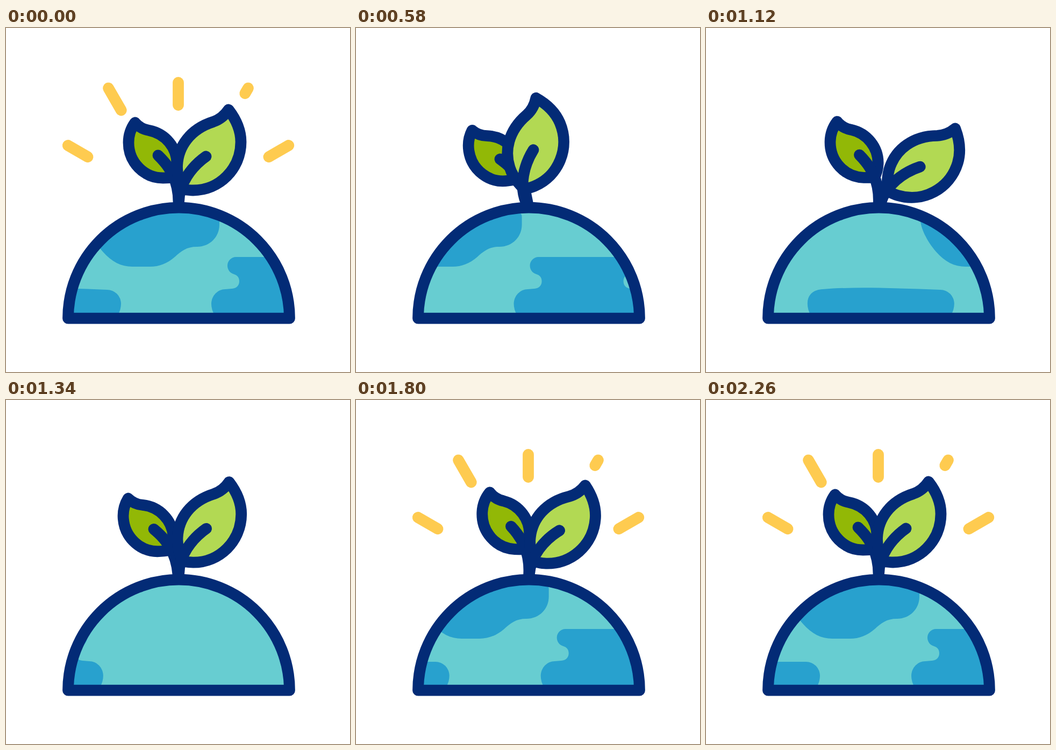
Recreate the animation shown at these times as an HTML page. Size 640 by 640 pixels, loop 2.4 s.

```html
<!DOCTYPE html>
<html lang="en">
<head>
<meta charset="utf-8">
<title>Sprouting globe</title>
<style>
html, body { margin: 0; width: 100%; height: 100%; overflow: hidden; background: #fff; }
svg { display: block; width: 100%; height: 100%; }
.ink { stroke: #032b76; stroke-width: 20.8; stroke-linecap: round; stroke-linejoin: round; }
.line { fill: none; }
.ray { stroke: #fecb50; stroke-width: 20.8; stroke-linecap: round; }
</style>
</head>
<body>
<svg viewBox="0 0 640 640" xmlns="http://www.w3.org/2000/svg">
  <defs>
    <clipPath id="dome"><path d="M115.5 540.2A206 206 0 0 1 527.5 540.2Z"/></clipPath>
    <g id="lands">
      <path d="M158 344H390Q397 344 397 351V366C397 388 380 407 355 407C336 407 326 415 314 426C300 438 285 444 268 444H235C214 444 197 435 180 416C163 396 151 372 151 355V351Q151 344 158 344Z"/>
      <path d="M428 426H592A16 16 0 0 1 608 442C608 450 603 456 596 458C589 460 586 465 586 471C586 479 591 484.5 600 485L612 486A26 27 0 0 1 638 513Q638 524 632 534H388Q382 524 382 513A26 27 0 0 1 408 486L420 485C429 484.5 434 479 434 471C434 465 431 460 424 458C417 456 412 450 412 442A16 16 0 0 1 428 426Z"/>
    </g>
  </defs>
  <g id="rays"></g>
  <g id="left">
    <path class="ink" fill="#92b806" d="M240 176C246 183 254 188.500 266 190.500C297 196.500 318 223 318 252C318 261 316 270 312 278C306 279 299 279 292 279C257 279 228 250 228 213C228 199 232 187 240 176Z"/>
    <path class="ink line" d="M283 237C304 257 321 283 321 324V337"/>
  </g>
  <g id="right">
    <path class="ink" fill="#b2d953" d="M414 152C408 161 400 169.500 385.500 174.500C344.500 187.500 318.500 219.500 318.500 260C319 276 323 290 329 300C335 301 341 302 348 302C397 302 437 262 437 212C437 190 428 170 414 152Z"/>
    <path class="ink line" d="M372 239C345 258 321.500 290 321.500 324V337"/>
  </g>
  <g clip-path="url(#dome)">
    <rect x="100" y="320" width="440" height="230" fill="#67cdd1"/>
    <g id="map" fill="#28a1ce">
      <use href="#lands"/>
      <path d="M-53 534Q-59 524 -59 513C-59 497 -49 487 -31 486C30 481 100 484 188 487A26 26 0 0 1 214 513Q214 524 208 534Z"/>
      <g id="next">
        <use href="#lands"/>
        <path d="M100 487H186A26 26 0 0 1 212 513Q212 524 206 534H100Z"/>
      </g>
    </g>
  </g>
  <path class="ink line" d="M115.5 540.2A206 206 0 0 1 527.5 540.2Z"/>
</svg>
<script>
const LOOP = 2400;
const ROOT = { x: 320.5, y: 337 };   // leaves turn and rays spread around this point
const SPAN = 1108, BACK = 89;        // map travel and its wind-up
const $ = id => document.getElementById(id);
const move = (id, value) => $(id).setAttribute("transform", value);

const part = (t, from, to) => Math.max(0, Math.min(1, (t - from) / (to - from)));
const smooth = u => u * u * (3 - 2 * u);

// Ease with flat ends; x1 and x2 are the handle lengths of a cubic Bezier.
function ease(u, x1, x2) {
  let lo = 0, hi = 1;
  for (let i = 0; i < 24; i++) {
    const s = (lo + hi) / 2, r = 1 - s;
    if (3 * r * r * s * x1 + 3 * r * s * s * x2 + s ** 3 < u) lo = s; else hi = s;
  }
  return smooth(lo);
}

const mapX = t => (SPAN + BACK) * ease(part(t, 610, 2060), 0.5, 0.368)
  - BACK * smooth(part(t, 0, 610));

// Sway between turning points given as [time, degrees], starting from rest.
function sway(t, turns) {
  let angle = 0, from = 0;
  for (const [time, next] of turns) {
    angle += (next - angle) * smooth(part(t, from, time));
    if (t < time) break;
    from = time;
  }
  return angle;
}

const LEFT = [[430, -18.8], [830, 12.2], [1320, -4.7], [1740, 3.3], [2160, 0]];
const RIGHT = [[500, -26.3], [990, 21.2], [1520, -7.2], [1860, 4.9], [2260, 0]];

// Angle, inner and outer radius
const rays = [[-60, 194.5, 237], [-30, 212.5, 260], [0, 193.5, 235.5], [30, 248.5, 260], [60, 194.5, 237]]
  .map(([angle, inner, outer]) => {
    const el = document.createElementNS("http://www.w3.org/2000/svg", "line");
    el.setAttribute("class", "ray");
    el.setAttribute("transform", `rotate(${angle})`);
    el.setAttribute("y1", -inner);
    $("rays").append(el);
    return { el, inner, outer };
  });

const rayLength = t => t < LOOP / 2
  ? 1 - part(t, 0, 200) ** 2
  : 1 - (1 - part(t, 1580, 1760)) ** 3;

function draw(t) {
  move("map", `translate(${mapX(t)} 0)`);
  move("left", `rotate(${sway(t, LEFT)} ${ROOT.x} ${ROOT.y})`);
  move("right", `rotate(${sway(t, RIGHT)} ${ROOT.x} ${ROOT.y})`);
  const k = rayLength(t);
  $("rays").setAttribute("visibility", k > 0 ? "visible" : "hidden");
  for (const { el, inner, outer } of rays) el.setAttribute("y2", -inner - (outer - inner) * k);
}

move("next", `translate(${-SPAN} 0)`);
move("rays", `translate(${ROOT.x} ${ROOT.y})`);

const start = performance.now();
function tick() {
  draw((performance.now() - start) % LOOP);
  requestAnimationFrame(tick);
}
tick();
</script>
</body>
</html>
```
